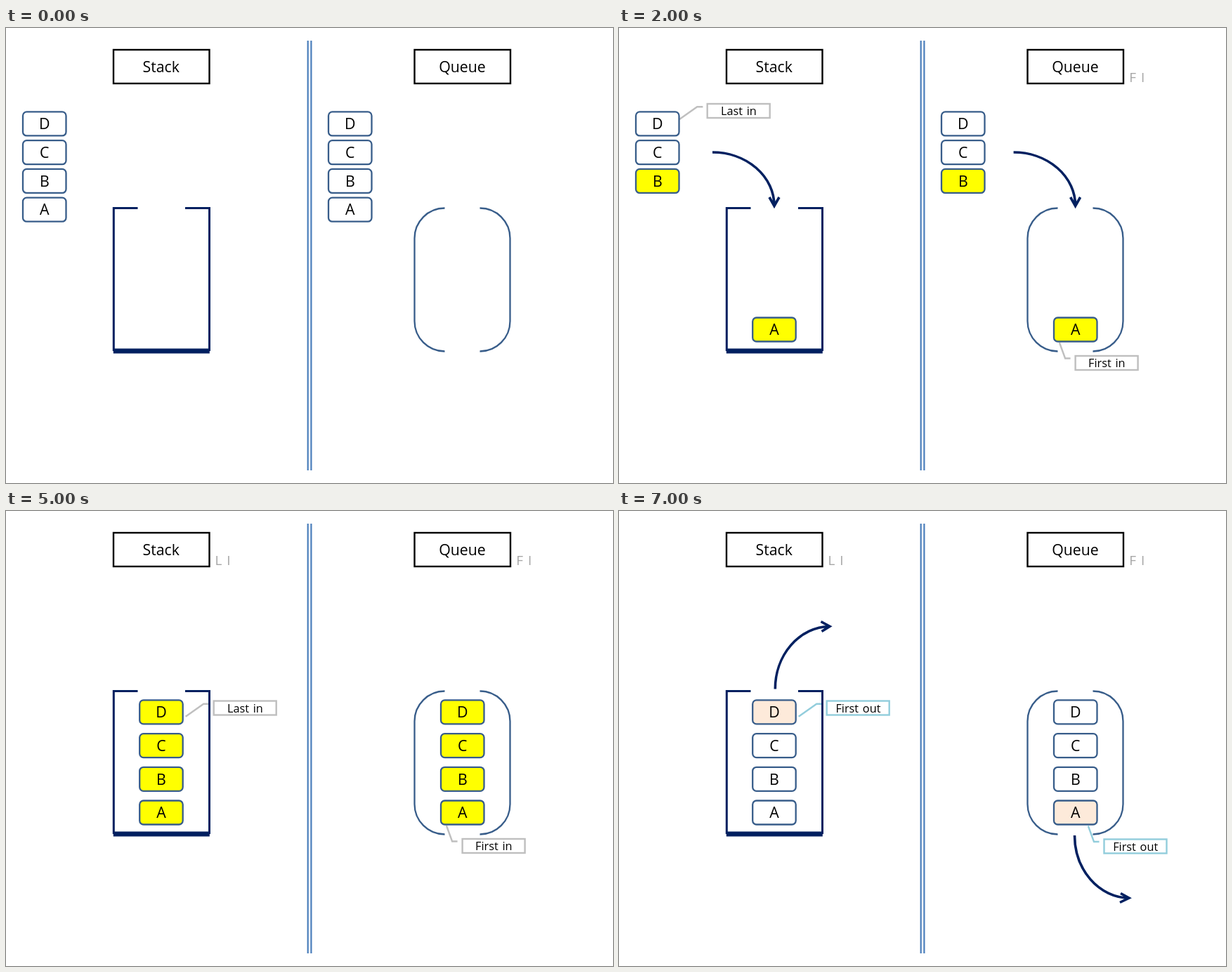
Animation of 864 by 648 pixels, one loop 8 s. Source, as an HTML page:

```html
<!DOCTYPE html>
<html lang="en">
<head>
<meta charset="utf-8">
<title>Stack and Queue</title>
<style>
  html, body { margin: 0; width: 100%; height: 100%; overflow: hidden; background: #fff; }
  svg { display: block; width: 100vw; height: 100vh; }
  text { font-family: "Open Sans", "Noto Sans", sans-serif; font-size: 21.3px; text-anchor: middle; }
  .note text { font-size: 16.3px; word-spacing: 1.5px; }
  .tag { font-size: 19px; text-anchor: start; word-spacing: 2px; fill: #a6a6a6; }
  .title { fill: #fff; stroke: #000; stroke-width: 2.4; }
  .block rect { stroke: #385d8a; stroke-width: 2.3; }
  .note { fill: none; stroke-width: 2.4; }
  .note text { fill: #000; stroke: none; }
  .arrow { fill: none; stroke: #002060; stroke-width: 3.6; }
</style>
</head>
<body>
<svg id="stage" viewBox="0 0 864 648">
  <rect width="864" height="648" fill="#fff"/>
  <path d="M429.7 18V630M434.4 18V630" stroke="#4a7ebb" stroke-width="2.2"/>
  <rect class="title" x="153" y="31" width="136.5" height="48"/>
  <rect class="title" x="581.5" y="31" width="136.5" height="48"/>
  <text x="220.7" y="63.3">Stack</text>
  <text x="649.5" y="63.3">Queue</text>
  <g id="notes"></g>
  <g fill="none">
    <path d="M187.5 256.5H153.3V460M255 256.5H289.5V460" stroke="#002060" stroke-width="3"/>
    <path d="M152.8 460H289.8" stroke="#002060" stroke-width="7.2"/>
    <path d="M624.5 256.5A43 43 0 0 0 581.5 299.5V417.5A43 43 0 0 0 624.5 460.5M674.5 256.5A43 43 0 0 1 717.5 299.5V417.5A43 43 0 0 1 674.5 460.5" stroke="#385d8a" stroke-width="2.3"/>
  </g>
  <g id="blocks"></g>
  <g id="arrows"></g>
  <text class="tag" id="lastTag" x="297.5" y="76.8">L I</text>
  <text class="tag" id="firstTag" x="726.3" y="76.8">F I</text>
</svg>
<script>
const NS = "http://www.w3.org/2000/svg";
const LOOP = 8000, STEP = 1000;
const YELLOW = "#ffff00", PEACH = "#fdeada", WHITE = "#ffffff";
const GREY = "#bfbfbf", AQUA = "#92cddc";
const $ = id => document.getElementById(id);

function add(parent, tag, attrs, text) {
  const el = document.createElementNS(NS, tag);
  for (const k in attrs) el.setAttribute(k, attrs[k]);
  if (text) el.textContent = text;
  parent.appendChild(el);
  return el;
}

const show = (el, on) => el.setAttribute("visibility", on ? "visible" : "hidden");
const move = (el, x, y) => el.setAttribute("transform", `translate(${x} ${y})`);

// Each side lists where a block waits and where it rests once inside.
const sides = [
  { waitX: 24, inX: 190.2, nextOut: 3 },
  { waitX: 459, inX: 619, nextOut: 0 }
];

const blocks = [];
for (const side of sides) {
  [..."ABCD"].forEach((letter, i) => {
    const el = add($("blocks"), "g", { class: "block" });
    const box = add(el, "rect", { width: 61.5, height: 34, rx: 5.5 });
    add(el, "text", { x: 30.8, y: 24.8 }, letter);
    blocks.push({ el, box, i, side });
  });
}

function note(x, y, leader, label, color) {
  const el = add($("notes"), "g", { class: "note", stroke: color });
  const g = add(el, "g", { transform: `translate(${x} ${y})` });
  add(g, "path", { d: leader });
  add(g, "rect", { width: 89, height: 20, fill: WHITE });
  add(g, "text", { x: 44.7, y: 16 }, label);
  return el;
}

const sideLead = "M-40 22.3L-14.5 4.2H-6.3";
const lowLead = "M-22.7 -19L-14.5 3.5H-7";
const lastIn = note(125.7, 108, sideLead, "Last in", GREY);
const firstIn = note(649.6, 467, lowLead, "First in", GREY);
const outNotes = [
  note(295.7, 270.5, sideLead, "First out", AQUA),
  note(690.5, 467.5, lowLead, "First out", AQUA)
];

const arrow = d => add($("arrows"), "path", { class: "arrow", d });
const inHead = "M133 177A88 76 0 0 1 221 253M214 241L221 253.5L228 241";
const inArrows = [arrow(inHead), arrow(inHead)];
move(inArrows[1], 428.6, 0);
const outArrows = [
  arrow("M222.3 253.5A78 89 0 0 1 299 164.5M287.5 157.5L300 164.3L288.5 171.5"),
  arrow("M648.5 462A78 89 0 0 0 725 551M714 544.5L726 551.2L713 557.5")
];

function draw(time) {
  const step = Math.floor((time % LOOP) / STEP);
  const filling = step >= 1 && step <= 4;
  const leaving = step === 7;

  for (const { el, box, i, side } of blocks) {
    const inside = step >= i + 2;
    if (inside) move(el, side.inX, 412.5 - 47.7 * i);
    else move(el, side.waitX, 241.7 - 40.75 * i);
    let fill = WHITE;
    if (step <= 5 && step > i) fill = YELLOW;
    if (leaving && i === side.nextOut) fill = PEACH;
    box.setAttribute("fill", fill);
  }

  show(lastIn, step >= 1 && step <= 5);
  move(lastIn, step >= 5 ? 170 : 0, step >= 5 ? 162.5 : 0);
  show(firstIn, step >= 1 && step <= 5);
  move(firstIn, step === 1 ? -160 : 0, step === 1 ? -171 : 0);

  inArrows.forEach(a => show(a, filling));
  [...outArrows, ...outNotes].forEach(a => show(a, leaving));
  show($("firstTag"), step >= 1);
  show($("lastTag"), step >= 5);
}

let start = null;
function tick(now) {
  if (start === null) start = now;
  draw(now - start);
  requestAnimationFrame(tick);
}
draw(0);
requestAnimationFrame(tick);
</script>
</body>
</html>
```
